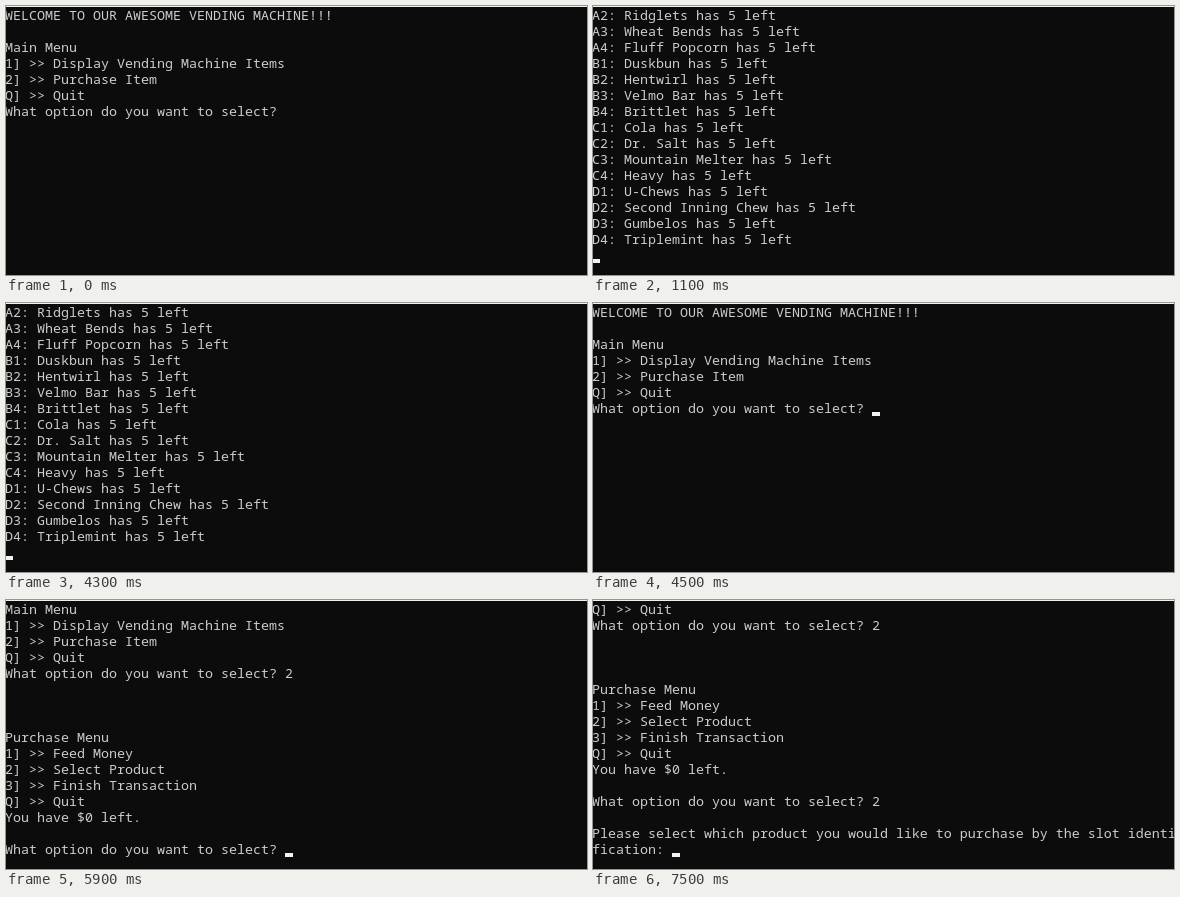
These frames come from a looping animation (581 by 269 pixels, 8 s). An HTML page:

```html
<!DOCTYPE html>
<html lang="en">
<head>
<meta charset="utf-8">
<title>Vending machine console</title>
<style>
  html, body { margin: 0; width: 100%; height: 100%; overflow: hidden; background: #0c0c0c; }
  #stage { position: absolute; left: 0; top: 0; width: 581px; height: 269px; overflow: hidden; background: #0c0c0c; }
  #edge { position: absolute; left: 0; top: 0; width: 100%; height: 1px; background: #f0f0f0; }
  #screen {
    position: absolute; left: -1px; top: 1px; margin: 0; color: #ccc;
    font: 13.333px/16px "Noto Sans Mono", "DejaVu Sans Mono", monospace;
    font-variant-ligatures: none; white-space: pre;
  }
  #cursor { position: absolute; width: 8px; height: 4px; background: #f2f2f2; }
</style>
</head>
<body>
<div id="stage">
  <pre id="screen"></pre>
  <div id="cursor"></div>
  <div id="edge"></div>
</div>
<script>
const LOOP = 8000, CELL_W = 8, CELL_H = 16;
const ask = "What option do you want to select? ";

const mainMenu = [
  "Main Menu",
  "1] >> Display Vending Machine Items",
  "2] >> Purchase Item",
  "Q] >> Quit"
];
const welcome = ["WELCOME TO OUR AWESOME VENDING MACHINE!!!", "", ...mainMenu, ask];

const products = [
  "Ridglets", "Wheat Bends", "Fluff Popcorn",
  "Duskbun", "Hentwirl", "Velmo Bar", "Brittlet",
  "Cola", "Dr. Salt", "Mountain Melter", "Heavy",
  "U-Chews", "Second Inning Chew", "Gumbelos", "Triplemint"
];
const slot = i => "ABCD"[i >> 2] + (i % 4 + 1);
const stock = [...products.map((name, i) => `${slot(i + 1)}: ${name} has 5 left`), ""];

const purchase = [
  ...mainMenu, ask + "2", "", "", "",
  "Purchase Menu",
  "1] >> Feed Money",
  "2] >> Select Product",
  "3] >> Finish Transaction",
  "Q] >> Quit",
  "You have $0 left.",
  "", ask
];

const type = (lines, key) => [...lines.slice(0, -1), lines.at(-1) + key];
const select = [
  ...type(purchase, "2").slice(3), "",
  "Please select which product you would like to purchase by the slot identi",
  "fication: "
];

// [start ms, lines, cursor visible]
const steps = [
  [0, welcome, 0],
  [500, welcome, 1],
  [800, type(welcome, "1"), 0],
  [900, type(welcome, "1"), 1],
  [1100, stock, 1],
  [1900, stock, 0],
  [2400, stock, 1],
  [2900, stock, 0],
  [3400, stock, 1],
  [3900, stock, 0],
  [4300, stock, 1],
  [4500, welcome, 1],
  [5300, welcome, 0],
  [5500, type(welcome, "2"), 1],
  [5800, purchase, 0],
  [5900, purchase, 1],
  [6800, purchase, 0],
  [7300, type(purchase, "2"), 1],
  [7500, select, 1]
];

const screenEl = document.getElementById("screen");
const cursorEl = document.getElementById("cursor");
let current = null;

function show(step) {
  const [, lines, visible] = step;
  screenEl.textContent = lines.join("\n");
  cursorEl.style.left = lines.at(-1).length * CELL_W - 1 + "px";
  cursorEl.style.top = lines.length * CELL_H - 3 + "px";
  cursorEl.style.visibility = visible ? "visible" : "hidden";
}

function tick() {
  const t = performance.now() % LOOP;
  const step = steps.findLast(s => s[0] <= t);
  if (step !== current) show(current = step);
  requestAnimationFrame(tick);
}
tick();
</script>
</body>
</html>
```
